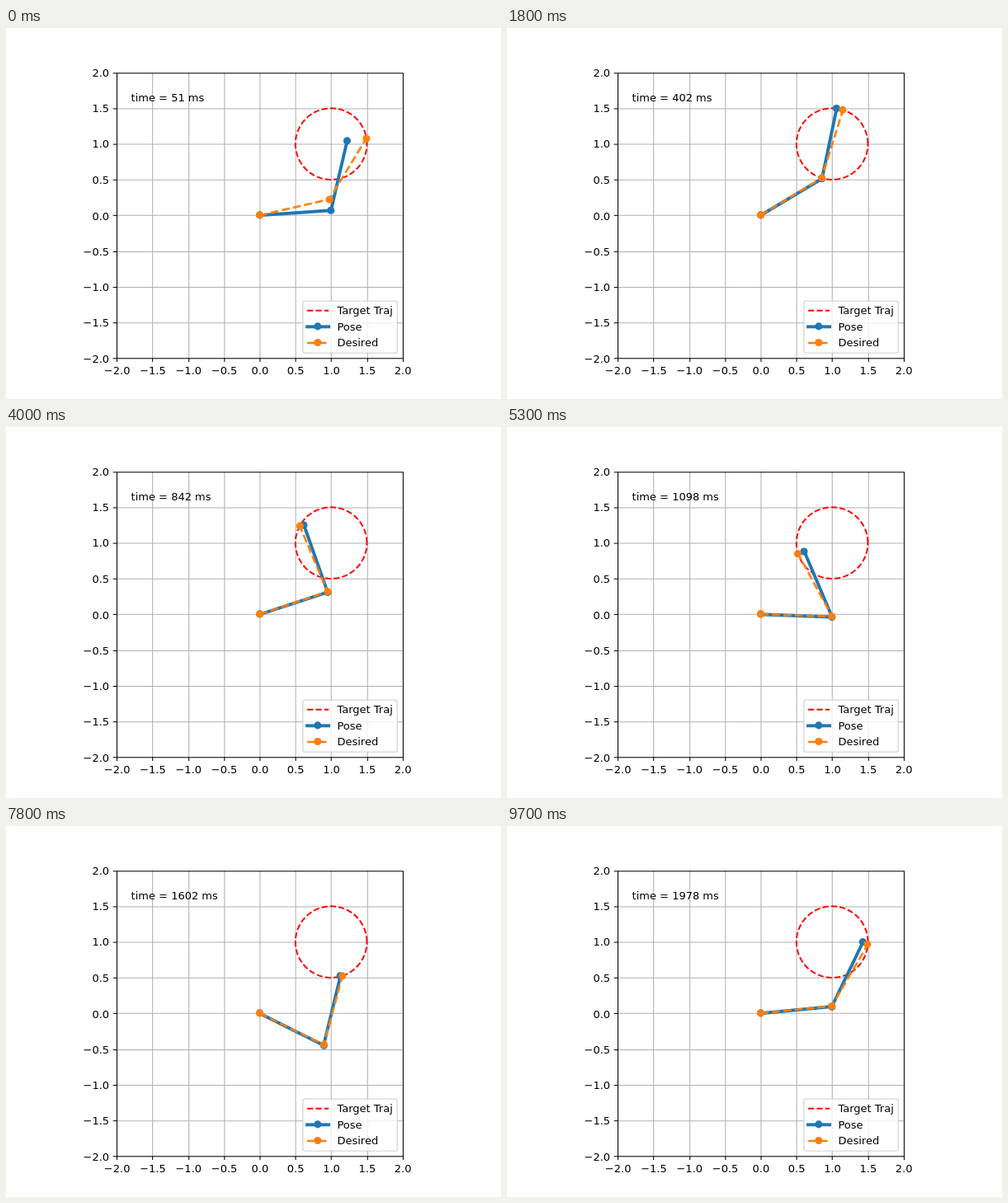
These frames come from a looping animation (600 px wide and 450 px high, 9800 ms). An HTML page with a canvas:

```html
<!DOCTYPE html>
<html>
<head>
<meta charset="utf-8">
<style>
html, body { margin: 0; width: 600px; height: 450px; overflow: hidden; background: #fff; }
canvas { display: block; }
</style>
</head>
<body>
<canvas id="plot" width="600" height="450"></canvas>
<script>
const ctx = document.getElementById('plot').getContext('2d');
ctx.scale(600 / 640, 450 / 480); // the figure is laid out on 640 x 480
const LOOP = 9800, STEP = 100;
const PT = 100 / 72; // pixels per point
const BOX = { left: 143.2, top: 57.6, right: 512.8, bottom: 427.2 };
const UNIT = 92.4;
const RED = '#ff0000', BLUE = '#1f77b4', ORANGE = '#ff7f0e';
const RAD = Math.PI / 180;
// Simulation clock: [step, milliseconds]
const CLOCK = [[0, 51], [18, 402], [40, 842], [53, 1098], [63, 1298], [78, 1602], [97, 1978]];

const px = x => 328 + x * UNIT;
const py = y => 242.4 - y * UNIT;
const snap = v => Math.floor(v + 0.5) + 0.5;

function simTime(step) {
  if (step === 0) return CLOCK[0][1];
  const i = CLOCK.findIndex(k => k[0] >= step);
  const [s0, t0] = CLOCK[i - 1], [s1, t1] = CLOCK[i];
  return 2 * Math.round((t0 + (t1 - t0) * (step - s0) / (s1 - s0)) / 2);
}

function stroke(points, color, width, dashed = false, cap = 'butt') {
  ctx.strokeStyle = color;
  ctx.lineWidth = width;
  ctx.lineCap = cap;
  ctx.lineJoin = 'round';
  ctx.setLineDash(dashed ? [3.7 * width, 1.6 * width] : []);
  ctx.beginPath();
  points.forEach(([x, y]) => ctx.lineTo(x, y));
  ctx.stroke();
  ctx.setLineDash([]);
}

function text(str, x, y, align = 'left') {
  ctx.fillStyle = '#000';
  ctx.font = `${10 * PT}px "DejaVu Sans", sans-serif`;
  ctx.textAlign = align;
  ctx.fillText(str, x, Math.round(y));
}

function markers(points, color) {
  ctx.fillStyle = color;
  for (const [x, y] of points) {
    ctx.beginPath();
    ctx.arc(Math.round(x), Math.round(y), 3.5 * PT, 0, 2 * Math.PI);
    ctx.fill();
  }
}

function arm([q1, q2], color, width, dashed) {
  const x = Math.cos(q1), y = Math.sin(q1);
  const points = [[0, 0], [x, y], [x + Math.cos(q1 + q2), y + Math.sin(q1 + q2)]]
    .map(([a, b]) => [px(a), py(b)]);
  stroke(points, color, width, dashed, dashed ? 'butt' : 'square');
  markers(points, color);
}

const onCircle = a => [1 + 0.5 * Math.cos(a), 1 + 0.5 * Math.sin(a)];

// Joint angles of a two-link arm of unit links, elbow down
function desired(ms) {
  const [x, y] = onCircle(Math.PI * ms / 1000);
  const half = Math.acos(Math.hypot(x, y) / 2);
  return [Math.atan2(y, x) - half, 2 * half];
}

// Tracking error: decaying start-up part plus a delayed, posture-dependent offset
function actual(ms) {
  const [q1, q2] = desired(ms);
  const [p1, p2] = desired(ms - 70);
  const since = ms - 51;
  const e1 = -8.6 * Math.exp(-since / 90) - 0.4;
  const e2 = 22 * Math.exp(-since / 150) + 10.3 * Math.cos(p1 + p2);
  return [q1 + e1 * RAD, q2 + e2 * RAD];
}

function drawGrid() {
  const { left, top, right, bottom } = BOX;
  const line = 0.8 * PT;
  for (let v = -2; v <= 2; v += 0.5) {
    const x = snap(px(v)), y = snap(py(v));
    if (Math.abs(v) < 2) {
      stroke([[x, top], [x, bottom]], '#b0b0b0', line);
      stroke([[left, y], [right, y]], '#b0b0b0', line);
    }
    stroke([[x, bottom], [x, bottom + 3.5 * PT]], '#000', line);
    stroke([[left, y], [left - 3.5 * PT, y]], '#000', line);
    const label = v.toFixed(1).replace('-', '\u2212');
    text(label, px(v) + 0.4, 448, 'center');
    text(label, left - 7 * PT, py(v) + 5.3, 'right');
  }
}

function drawFrame() {
  const x = snap(BOX.left), y = snap(BOX.top);
  ctx.strokeStyle = '#000';
  ctx.lineWidth = 0.8 * PT;
  ctx.lineJoin = 'miter';
  ctx.strokeRect(x, y, snap(BOX.right) - x, snap(BOX.bottom) - y);
}

function drawLegend() {
  ctx.beginPath();
  ctx.roundRect(383.8, 353.3, 122.1, 67, 2.8);
  ctx.fillStyle = 'rgba(255,255,255,0.8)';
  ctx.fill();
  ctx.strokeStyle = 'rgba(204,204,204,0.8)';
  ctx.lineWidth = PT;
  ctx.stroke();
  const rows = [['Target Traj', RED, 1.5, true], ['Pose', BLUE, 3, false], ['Desired', ORANGE, 2, true]];
  rows.forEach(([name, color, width, dashed], i) => {
    const y = 365 + i * 21;
    stroke([[389.4, y + 0.5], [417.2, y + 0.5]], color, width * PT, dashed, dashed ? 'butt' : 'square');
    if (i) markers([[403.3, y]], color);
    text(name, 428.2, y + 5);
  });
}

function draw(step) {
  const ms = simTime(step);
  ctx.fillStyle = '#fff';
  ctx.fillRect(0, 0, 640, 480);
  drawGrid();

  const circle = Array.from({ length: 101 }, (_, i) => {
    const [x, y] = onCircle(i * Math.PI / 50);
    return [px(x), py(y)];
  });
  stroke(circle, RED, 1.5 * PT, true);
  arm(actual(ms), BLUE, 3 * PT, false);
  arm(desired(ms), ORANGE, 2 * PT, true);

  drawFrame();
  text(`time = ${ms} ms`, px(-1.8), py(1.6));
  drawLegend();
}

function tick() {
  draw(Math.floor(performance.now() % LOOP / STEP));
  requestAnimationFrame(tick);
}
tick();
</script>
</body>
</html>
```
